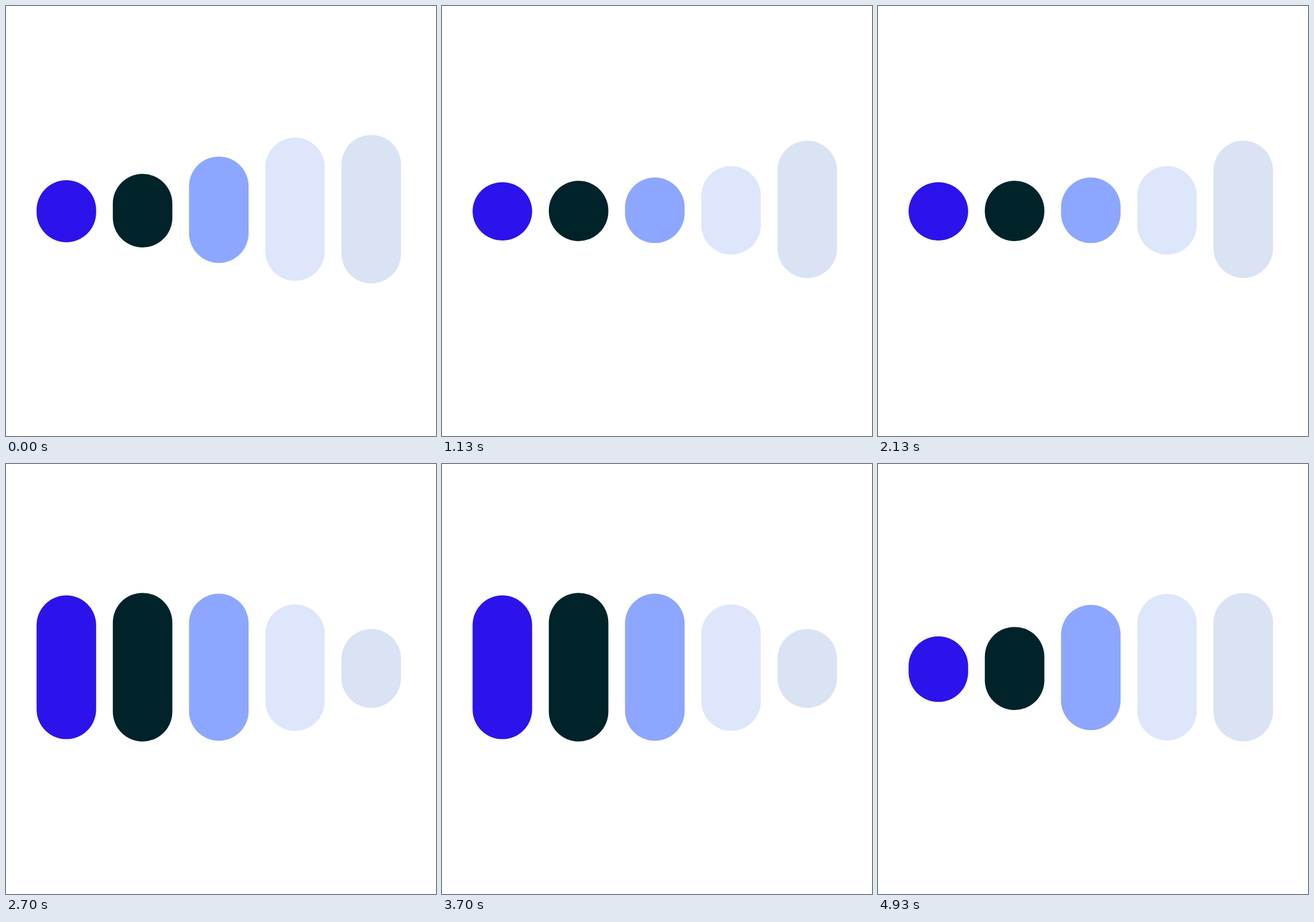
An HTML page for the animation above (5.01 s loop, 748 by 748 pixels).

```html
<!DOCTYPE html>
<html lang="en">
<head>
<meta charset="utf-8">
<title>Pulsing bars</title>
<style>
  html, body { margin: 0; width: 100%; height: 100%; overflow: hidden; background: #fff; }
  svg { display: block; width: 100%; height: 100%; }
</style>
</head>
<body>
<svg id="stage" viewBox="0 0 748 748"></svg>
<script>
const LOOP = 5010, CYCLE = 20, LAST = 99;
const LEFT = 53.2, PITCH = 132.6, WIDTH = 103.6;
const TALL = 258.5, TALL_Y = 353.4;

// Heights at these ticks of a 20-tick cycle; lift moves the centre down as a bar shrinks.
const ticks = [0, 3, 5, 7, 8, 10, 12, 14, 16, 17, 19];
const bars = [
  { fill: '#2c13eb', lift: .024, h: [108, 101.5, 114, 158, 206, 249, 258, 250, 180, 145, 114] },
  { fill: '#002329', lift: .02, h: [128, 105, 103.5, 116, 130, 206, 251.5, 258.5, 249, 218.5, 144.5] },
  { fill: '#8da6ff', lift: .0135, h: [185, 114, 105, 104, 109.5, 137, 221.5, 256, 258, 255, 218] },
  { fill: '#dde6fa', lift: .02, h: [249, 154, 116, 105.5, 103.5, 109, 135.5, 220, 254.5, 258, 255] },
  { fill: '#dae3f3', lift: .018, h: [258.5, 239, 161, 119, 111, 105, 110, 137, 223, 243, 258] }
];

const n = ticks.length;
const wrap = i => (i + n) % n;
const gap = i => (ticks[wrap(i + 1)] - ticks[wrap(i)] + CYCLE) % CYCLE;
const slope = (h, i) => (h[wrap(i + 1)] - h[wrap(i)]) / gap(i);

// Monotone tangent: flat at peaks, harmonic mean elsewhere.
function tangent(h, i) {
  const a = slope(h, i - 1), b = slope(h, i);
  return a * b <= 0 ? 0 : 2 * a * b / (a + b);
}

function heightAt(h, tick) {
  let i = n - 1;
  while (ticks[i] > tick) i--;
  const d = gap(i), u = (tick - ticks[i]) / d, v = 1 - u;
  return v * v * (1 + 2 * u) * h[i] + u * u * (3 - 2 * u) * h[wrap(i + 1)]
    + d * u * v * (v * tangent(h, i) - u * tangent(h, i + 1));
}

const stage = document.getElementById('stage');
bars.forEach((bar, i) => {
  const r = document.createElementNS(stage.namespaceURI, 'rect');
  const attrs = { x: LEFT + i * PITCH, width: WIDTH, rx: WIDTH / 2, ry: WIDTH / 2, fill: bar.fill };
  for (const key in attrs) r.setAttribute(key, attrs[key]);
  bar.el = stage.appendChild(r);
});

// Ticks alternate between 30 ms and 70 ms.
function tickAt(ms) {
  const k = 2 * Math.floor(ms / 100) + (ms % 100 >= 30 ? 1 : 0);
  return Math.min(k, LAST) % CYCLE;
}

function draw(ms) {
  const tick = tickAt(ms % LOOP);
  for (const { el, h, lift } of bars) {
    const height = heightAt(h, tick);
    const cy = TALL_Y + (TALL - height) * lift;
    el.setAttribute('y', cy - height / 2);
    el.setAttribute('height', height);
  }
}

const start = performance.now();
function loop() {
  draw(performance.now() - start);
  requestAnimationFrame(loop);
}
loop();
</script>
</body>
</html>
```
